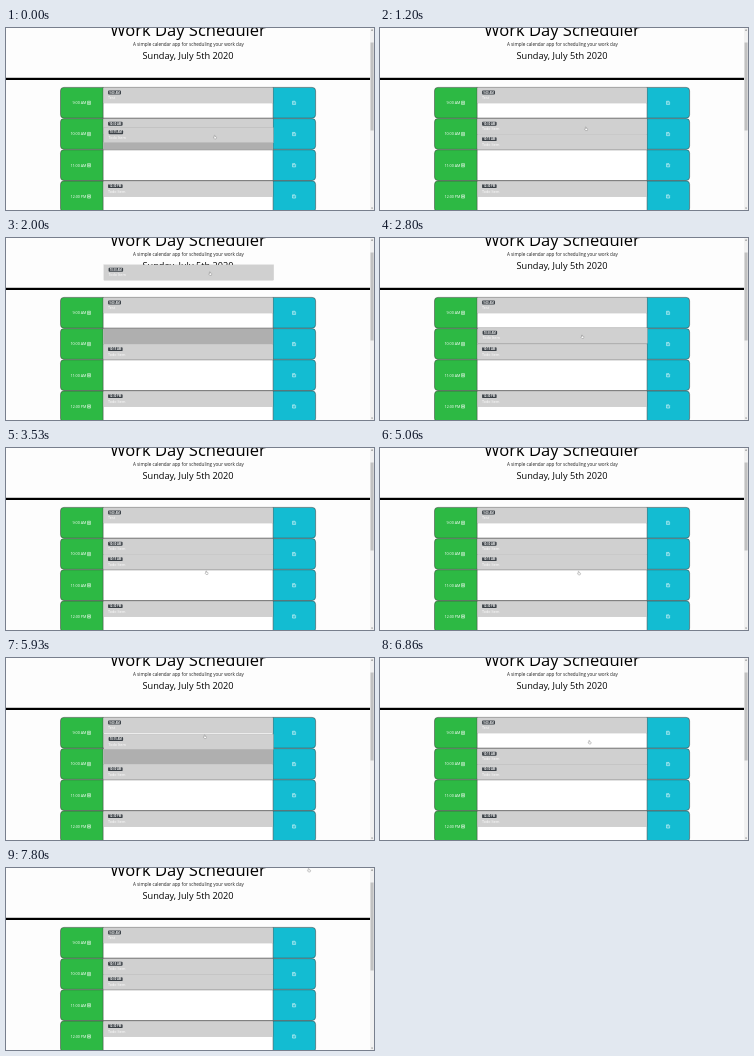
Animation, 368 px wide and 182 px high, one loop 7.86 s. Source, as an HTML page:

```html
<!DOCTYPE html>
<html lang="en">
<head>
<meta charset="utf-8">
<title>Work Day Scheduler</title>
<style>
  html, body { margin: 0; width: 100%; height: 100%; overflow: hidden; background: #fdfdfd; }
  svg { display: block; width: 100vw; height: 100vh; font-family: "Open Sans", sans-serif; }
  .mid { text-anchor: middle; }
  .light { fill: #fff; font-size: 3.68px; }
  .badge { font-weight: 700; font-size: 2.76px; fill: #eee; }
  .card { fill: #d0d0d0; stroke: #000; stroke-opacity: .25; stroke-width: .23px; }
  .frame { fill: none; stroke: #444; stroke-width: .55px; }
  .icon { fill: none; stroke: #fff; stroke-width: .5px; }
</style>
</head>
<body>
<svg viewBox="0 0 368 182" preserveAspectRatio="none">
  <g class="mid">
    <text x="182" y="7.9" font-size="16.56">Work Day Scheduler</text>
    <text x="182.4" y="17.7" font-size="4.6" fill="#222">A simple calendar app for scheduling your work day</text>
    <text x="182" y="31" font-size="9.2">Sunday, July 5th 2020</text>
  </g>
  <rect y="49.8" width="364.1" height="2.2"/>
  <g id="rows"></g>
  <rect id="slot" x="97.4" width="169.6" height="15.4" fill="#afafaf"/>
  <g id="moving"></g>
  <g id="scrollbar">
    <rect x="364.1" width="3.9" height="182" fill="#f1f1f1"/>
    <rect x="364.5" y="14.5" width="3.1" height="88" fill="#c1c1c1"/>
    <path d="M365.1 2.4h1.9l-.95-1.1zM365.1 179.7h1.9l-.95 1.1z" fill="#505050"/>
  </g>
  <path id="cursor" d="M-.8-1.4q.4-.4.8 0v1.1l1.3.3q.3.2.2.7l-.4 1.3h-1.6l-1-1.3q0-.5.7-.2z"
        fill="#fff" stroke="#666" stroke-width=".35"/>
</svg>
<script>
  const LOOP = 7860, STEP = LOOP / 118;
  const LEFT = 54.5, RIGHT = 309.6, LIST = 97.1, SAVE = 267.1;
  const ROW_H = 30.7, PITCH = 31.2, CARD_H = 15.4;
  const rowTop = i => 59.4 + PITCH * i;
  const TOP = rowTop(1) + .3, SECOND = TOP + CARD_H;
  const get = id => document.getElementById(id);
  const mix = (a, b, k) => a + (b - a) * k;
  const bump = k => Math.sin(Math.PI * k) ** 2;

  function card(id, time, note, y) {
    const w = time.length > 7 ? 14.5 : 12.9;
    return `<g id="${id}" transform="translate(${LIST + .3} ${y})">
      <rect class="card" width="169.6" height="${CARD_H}"/>
      <rect x="4.7" y="2.9" width="${w}" height="3.9" rx=".9" fill="#3b4147"/>
      <text class="badge mid" x="${4.7 + w / 2}" y="5.9">${time}</text>
      <text class="light" x="4.7" y="11.4">${note}</text></g>`;
  }

  function row(time, i) {
    const y = rowTop(i), c = y + ROW_H / 2, b = y + ROW_H, r = 3.45;
    return `
      <rect x="${LIST}" y="${y}" width="${SAVE - LIST}" height="${ROW_H}" fill="#fff"/>
      <path fill="#2db944" d="M${LIST} ${y}H${LEFT + r}a${r} ${r} 0 0 0 ${-r} ${r}V${b - r}a${r} ${r} 0 0 0 ${r} ${r}H${LIST}z"/>
      <path fill="#13bcd2" d="M${SAVE} ${y}H${RIGHT - r}a${r} ${r} 0 0 1 ${r} ${r}V${b - r}a${r} ${r} 0 0 1 ${-r} ${r}H${SAVE}z"/>
      <text class="light" x="80.4" y="${c + 1.4}" text-anchor="end">${time}</text>
      <g class="icon">
        <path d="M81.5 ${c - 1.5}h3v3.2h-3zM83 ${c - .9}v2M82 ${c + .1}h2"/>
        <path d="M286.5 ${c - 1.5}h2.5l.6.6v2.6h-3.1zM287 ${c - .6}h1.8M287.5 ${c + .7}h1"/>
      </g>
      <path class="frame" d="M${LIST} ${y}V${b}M${SAVE} ${y}V${b}"/>
      <rect class="frame" x="${LEFT}" y="${y}" width="${RIGHT - LEFT}" height="${ROW_H}" rx="${r}"/>`;
  }

  get("rows").innerHTML = ["9:00 AM", "10:00 AM", "11:00 AM", "12:00 PM"].map(row).join("") +
    card("nine", "9:00 AM", "Test", rowTop(0) + .3) + card("noon", "12:30 PM", "Todo Item", rowTop(3) + .3);
  get("moving").innerHTML =
    card("half", "10:30 AM", "Todo Item", TOP) + card("quarter", "10:15 AM", "Todo Item", SECOND);

  // Each drag lifts a card and lowers it again; grip is the pointer's depth inside the card
  const drags = [
    { id: "quarter", start: -400, end: 400, from: SECOND, to: SECOND, lift: 6.9, grip: 9.5 },
    { id: "half", start: 1260, end: 2860, from: TOP, to: TOP, lift: 65, grip: 8.5 },
    { id: "quarter", start: 4140, end: 4860, from: SECOND, to: SECOND, lift: 79, grip: 4.7 },
    { id: "quarter", start: 5260, end: 6046, from: SECOND, to: TOP, lift: 83, grip: 2.4 }
  ];
  const last = drags[drags.length - 1];

  function dragTop(d, t) {
    const k = (t - d.start) / (d.end - d.start);
    return mix(d.from, d.to, k) - d.lift * bump(k);
  }

  function pointer(t, drag) {
    const x = 209 - 10 * Math.min(1, t / 4200);
    if (drag) return [x, dragTop(drag, t) + drag.grip];
    if (t >= last.end) {
      const k = Math.min(1, (t - last.end) / (LOOP - 70 - last.end)) ** 3;
      return [mix(x, 303, k), mix(last.to + last.grip, 2, k)];
    }
    // Between drags the pointer dips on its way to the next card
    const i = drags.findIndex(d => d.start > t), a = drags[i - 1], b = drags[i];
    const k = (t - a.end) / (b.start - a.end);
    const ease = k * k * (3 - 2 * k);
    return [x, mix(a.to + a.grip, b.from + b.grip, ease) + 19 * bump(k)];
  }

  function place(id, x, y) {
    get(id).setAttribute("transform", `translate(${x} ${y})`);
  }

  function draw(t) {
    const drag = drags.find(d => t >= d.start && t < d.end);
    const other = id => id === "half" ? "quarter" : "half";
    const top = drag && dragTop(drag, t);
    let first = t < last.end ? "half" : "quarter";
    if (drag) {
      const upper = top < TOP + CARD_H / 2;
      first = upper ? drag.id : other(drag.id);
      get("slot").setAttribute("y", upper ? TOP : SECOND);
    }
    get("slot").style.display = drag ? "" : "none";
    place(first, LIST + .3, TOP);
    place(other(first), LIST + .3, SECOND);
    if (drag) place(drag.id, LIST + .8, top);
    place("cursor", ...pointer(t, drag));
  }

  const begin = performance.now();
  function tick() {
    const t = (performance.now() - begin) % LOOP;
    draw(Math.floor(t / STEP) * STEP);
    requestAnimationFrame(tick);
  }
  tick();
</script>
</body>
</html>
```
